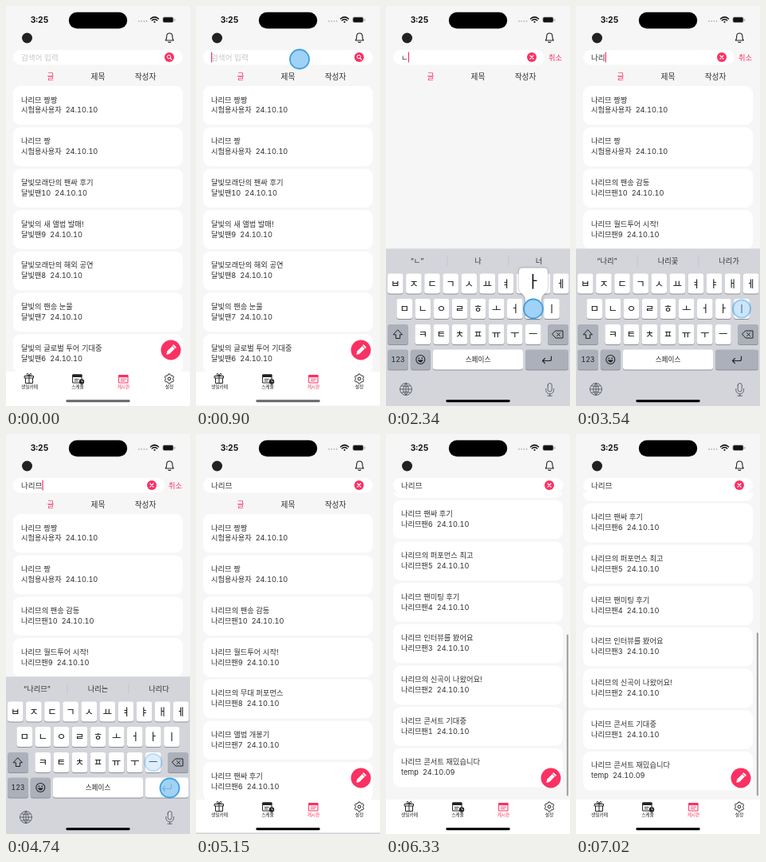
These frames come from a looping animation (231 px wide and 500 px high, 7070 ms). An HTML page:

```html
<!DOCTYPE html>
<html lang="ko">
<head>
<meta charset="utf-8">
<title>게시판 검색</title>
<style>
html, body { margin: 0; height: 100%; overflow: hidden; background: #f6f6f6; }
svg { display: block; width: 100%; height: 100%; }
text { font-family: Inter, "Noto Sans CJK KR", sans-serif; font-variant-numeric: tabular-nums; white-space: pre; }
</style>
</head>
<body>
<svg id="stage" viewBox="0 0 231 500">
  <defs><clipPath id="view"><path d="M0 73H231V457H0z"/></clipPath></defs>
</svg>
<script>
const LOOP = 7070, PINK = '#fa3163', INK = '#303030', PITCH = 51.7, MAX = 323.4;
const stage = document.getElementById('stage');

function el(tag, attrs, parent = stage) {
  const node = document.createElementNS('http://www.w3.org/2000/svg', tag);
  for (const k in attrs) node.setAttribute(k, attrs[k]);
  return parent.appendChild(node);
}
const group = (parent, attrs = {}) => el('g', attrs, parent);
const box = (parent, x, y, width, height, rx, fill) =>
  el('rect', { x, y, width, height, rx, fill }, parent);
const disc = (parent, cx, cy, r, fill) => el('circle', { cx, cy, r, fill }, parent);
const line = (parent, d, stroke = '#222', width = 1, fill = 'none') =>
  el('path', { d, stroke, fill, 'stroke-width': width, 'stroke-linecap': 'round', 'stroke-linejoin': 'round' }, parent);
function label(parent, str, x, y, size, fill = INK, anchor = 'start', weight = 400) {
  const node = el('text', { x, y: y + size * 0.38, 'font-size': size, fill, 'text-anchor': anchor, 'font-weight': weight }, parent);
  node.textContent = str;
  return node;
}
const show = (node, on) => node.setAttribute('display', on ? 'inline' : 'none');
const move = (node, x, y) => node.setAttribute('transform', `translate(${x} ${y})`);
const clamp = v => Math.max(0, Math.min(1, v));
const easeOut = v => 1 - (1 - clamp(v)) ** 3;

// Posts: [title, author, date]
const DAY = '24.10.10';
const numbered = (titles, fan) => titles.map((title, i) => [title, fan + (10 - i), DAY]);
const pinned = [['나리므 짱짱', '시험용사용자', DAY], ['나리므 짱', '시험용사용자', DAY]];
const allPosts = [...pinned, ...numbered([
  '달빛모래단의 팬싸 후기', '달빛의 새 앨범 발매!', '달빛모래단의 해외 공연',
  '달빛의 팬송 눈물', '달빛의 글로벌 투어 기대중'], '달빛팬')];
const hits = [...pinned, ...numbered([
  '나리므의 팬송 감동', '나리므 월드투어 시작!', '나리므의 무대 퍼포먼스', '나리므 앨범 개봉기',
  '나리므 팬싸 후기', '나리므의 퍼포먼스 최고', '나리므 팬미팅 후기', '나리므 인터뷰를 봤어요',
  '나리므의 신곡이 나왔어요!', '나리므 콘서트 기대중'], '나리므팬'),
  ['나리므 콘서트 재밌습니다', 'temp', '24.10.09']];

function postList(parent, posts) {
  const g = group(parent);
  posts.forEach(([title, author, date], i) => {
    const y = 117 + i * PITCH;
    box(g, 9, y - 17, 213, 48.6, 9, '#fff');
    label(g, title, 19, y, 9.3);
    label(g, `${author}  ${date}`, 19, y + 13, 9.2);
  });
  return g;
}

box(stage, 0, 0, 231, 500, 0, '#f6f6f6');
const scroller = group(group(stage, { 'clip-path': 'url(#view)' }));
[['글', 56, PINK], ['제목', 115.5, INK], ['작성자', 175, INK]].forEach(([s, x, c]) =>
  label(scroller, s, x, 88, 9.7, c, 'middle', 500));
const listAll = postList(scroller, allPosts), listHits = postList(scroller, hits);
const bar = box(stage, 226.8, 78, 2.2, 204, 1.1, '#a5a5a5');

// Status bar and header
label(stage, '3:25', 42, 17.3, 10.3, '#111', 'middle', 700);
box(stage, 78.8, 7.8, 73.4, 20.4, 10.2, '#000');
for (let i = 0; i < 4; i++) disc(stage, 167 + i * 3.2, 19, 0.8, '#999');
line(stage, 'M181.5 16Q186.5 11.8 191.5 16M183.3 18Q186.5 15.4 189.7 18', '#111', 1.5);
disc(stage, 186.5, 20, 1.1, '#111');
box(stage, 196.5, 13.5, 14, 7.5, 2.2, '#aaa');
box(stage, 197.3, 14.3, 12.4, 5.9, 1.6, '#111');
box(stage, 211.2, 16, 1.2, 2.8, 0.6, '#aaa');
disc(stage, 26.5, 40, 6.5, '#222');
line(stage, 'M200.3 43C201.8 41.6 201.5 39.8 201.7 37.6C202 32.8 208.6 32.8 208.9 37.6C209.1 39.8 208.8 41.6 210.3 43z', '#222', 1.1);
line(stage, 'M203.8 45Q205.3 46.1 206.8 45', '#222', 1.1);

// Search field
const field = box(stage, 9, 55, 213, 18.3, 9, '#fff');
const hint = label(stage, '검색어 입력', 19, 64, 9.6, '#c6c6c6');
const typed = label(stage, '', 19, 64.3, 9.6);
const caret = box(stage, 19, 57.5, 1.2, 13, 0.5, PINK);
const cancel = label(stage, '취소', 204, 64, 9.3, PINK);
const button = group(stage);
disc(button, 0, 64, 6, PINK);
const lens = group(button), cross = group(button);
line(lens, 'M1.2 65.2L3 67', '#fff', 1.1);
el('circle', { cx: -0.4, cy: 63.5, r: 2.2, fill: 'none', stroke: '#fff' }, lens);
line(cross, 'M-2 62L2 66M2 62L-2 66', '#fff', 1.2);

// Write button
disc(stage, 207, 430, 12.5, PINK);
line(stage, 'M201.8 435.2L202.6 431.6L208.8 425.4L211.6 428.2L205.4 434.4z', '#fff', 0.6, '#fff');
line(stage, 'M210.2 424.2L212.8 426.8', '#fff', 1.9);

// Tab bar
box(stage, 0, 457, 231, 43, 0, '#fff');
line(stage, 'M24.5 465V471.5H33.5V465M23.5 462.5H34.5V465H23.5zM29 462.5V471.5M29 462.3C26 462.3 25.3 459.5 27 459.5C28.3 459.5 29 461 29 462.3C29 461 29.7 459.5 31 459.5C32.7 459.5 32 462.3 29 462.3', '#222', 1);
line(stage, 'M84 461H95V471H84z', '#222', 1);
box(stage, 83.6, 460.5, 11.8, 3.5, 1, '#222');
line(stage, 'M86.2 466.5H91M86.2 468.7H90', '#222', 0.9);
disc(stage, 95, 469.5, 3.2, '#222');
line(stage, 'M95 467.8V469.6H96.4', '#fff', 0.7);
line(stage, 'M142 461.5H153V471H142z', PINK, 1);
box(stage, 141.6, 461, 11.8, 3.2, 1, PINK);
line(stage, 'M144.3 466.3H150.7M144.3 468.6H149', PINK, 0.9);
let gear = '';
for (let i = 0; i < 24; i++) {
  const a = (i - 0.5) * Math.PI / 12, r = i % 4 < 2 ? 6 : 4.8;
  gear += `${i ? 'L' : 'M'}${205 + r * Math.sin(a)} ${466 - r * Math.cos(a)}`;
}
line(stage, gear + 'z', '#222', 1);
el('circle', { cx: 205, cy: 466, r: 1.9, fill: 'none', stroke: '#222' });
[['생일카페', 29.5], ['스케줄', 90], ['게시판', 147.5], ['설정', 205]].forEach(([s, x], i) =>
  label(stage, s, x, 476, 5.7, i === 2 ? PINK : '#222', 'middle', 500));

// Keyboard
const board = group(stage);
box(board, 0, 303.3, 231, 200, 0, '#d3d5db');
line(board, 'M77 312V325M154 312V325', '#bfc2c9', 0.7);
const words = [39, 115.5, 192].map(x => label(board, '', x, 318, 9.3, '#333', 'middle'));

function key(x, y, w, fill = '#fff') {
  box(board, x - w / 2, y - 11.6, w, 25, 3, '#8d9097');
  return box(board, x - w / 2, y - 12.4, w, 25, 3, fill);
}
const keys = {};
[['ㅂㅈㄷㄱㅅㅛㅕㅑㅐㅔ', 11.8, 347], ['ㅁㄴㅇㄹㅎㅗㅓㅏㅣ', 23.2, 378.5], ['ㅋㅌㅊㅍㅠㅜㅡ', 46.2, 410.5]]
  .forEach(([row, x0, y]) => [...row].forEach((c, i) => {
    const x = x0 + i * 23.1;
    keys[c] = [x, y];
    key(x, y, 19.6);
    label(board, c, x, y, 12.5, '#111', 'middle', 500);
  }));
const DARK = '#abb0ba';
key(15, 410.5, 26, DARK);
key(216, 410.5, 26, DARK);
key(15, 442, 26, DARK);
key(43.3, 442, 25, DARK);
key(115.5, 442, 113);
const enter = key(202, 442, 54, DARK);
keys.enter = [205.5, 442.5];
line(board, 'M15 405L20.5 410.8H17.6V415.5H12.4V410.8H9.5z', '#222', 1);
line(board, 'M213 406H222V415H213L208.8 410.5zM214.6 408.6L218.6 412.6M218.6 408.6L214.6 412.6', '#222', 1);
label(board, '123', 15, 442, 8.8, '#222', 'middle');
el('circle', { cx: 43.3, cy: 442, r: 5.5, fill: 'none', stroke: '#222', 'stroke-width': 1.1 }, board);
disc(board, 41.4, 440.3, 0.9, '#222');
disc(board, 45.2, 440.3, 0.9, '#222');
line(board, 'M40.4 443Q43.3 447.4 46.2 443z', '#222', 0.7, '#222');
label(board, '스페이스', 115.5, 442, 8.6, '#222', 'middle');
line(board, 'M207.5 438V441.5Q207.5 443.5 205.5 443.5H196.5M199.5 440.5L196.5 443.5L199.5 446.5', '#222', 1.1);
const GREY = '#555a61';
line(board, 'M17.5 479A7.5 7.5 0 1 0 32.5 479A7.5 7.5 0 1 0 17.5 479M17.5 479H32.5M25 471.5V486.5M25 471.5Q18 479 25 486.5Q32 479 25 471.5M19.3 474.7Q25 477 30.7 474.7M19.3 483.3Q25 481 30.7 483.3', GREY, 0.9);
line(board, 'M203.2 474V479.5A2.5 2.5 0 0 0 208.2 479.5V474A2.5 2.5 0 0 0 203.2 474zM200.8 478.5V480A4.9 4.9 0 0 0 210.6 480V478.5M205.7 485V487.3M203 487.3H208.4', GREY, 0.9);

const bubble = group(board, { style: 'filter:drop-shadow(0 0.5px 1.5px rgba(0,0,0,.35))' });
el('path', { fill: '#fff', d: 'M-13.5 -51H13.5Q18 -51 18 -46V-26C18 -19 10 -19 10 -11V9Q10 12.5 7 12.5H-7Q-10 12.5 -10 9V-11C-10 -19 -18 -19 -18 -26V-46Q-18 -51 -13.5 -51z' }, bubble);
const bubbleText = label(bubble, '', 0, -34, 20, '#111', 'middle');

const home = box(stage, 75.3, 492.3, 80.4, 2.9, 1.45, '#000');

// Touches: [spot, down, up]
const touches = [
  ['field', 100, 980], ['ㄴ', 1660, 1800], ['ㅏ', 2240, 2420], ['ㄹ', 2850, 2990],
  ['ㅣ', 3340, 3430], ['ㅁ', 3840, 3980], ['ㅡ', 4440, 4580], ['enter', 4690, 4850], ['drag', 5480, 5760]
].map(([spot, down, up]) => ({
  spot, down, up,
  dot: el('circle', { r: 12, fill: '#8fcaf5', 'fill-opacity': 0.85, stroke: '#409fe4', 'stroke-width': 1.8 })
}));

// Typing: [time, text, second and third suggestion]
const typing = [
  [0, '', '내가', '나'], [1760, 'ㄴ', '나', '너'], [2430, '나', '나는', '나도'], [2950, '날', '날씨', '날이'],
  [3430, '나리', '나리꽃', '나리가'], [3940, '나림', '나리는', '나리'], [4600, '나리므', '나리는', '나리다']
];

function scrollAt(t) {
  if (t < 5500) return 0;
  if (t < 5710) return 206.5 * (t - 5500) / 210;
  if (t < 5950) return 206.5 + 140 * (1 - (1 - (t - 5710) / 240) ** 2);
  const u = (t - 5950) / 120;
  return MAX + (346.5 - MAX) * (1 + u) * Math.exp(-u);
}

function render(t) {
  const [, text, second, third] = typing.findLast(step => t >= step[0]);
  const open = easeOut((t - 900) / 400) * (1 - easeOut((t - 4850) / 400));
  const scroll = scrollAt(t);

  move(board, 0, 198 * (1 - open));
  field.setAttribute('width', 213 - 23 * open);
  move(button, 205 - 22 * open, 0);
  move(cancel, 27 * (1 - open), 0);
  show(cancel, open > 0);
  home.setAttribute('fill', text ? '#000' : '#666');

  typed.textContent = text;
  show(hint, !text);
  show(lens, !text);
  show(cross, text);
  show(caret, t >= 900 && t < 4850);
  caret.setAttribute('x', 19 + (text ? typed.getComputedTextLength() : 0));
  [text ? `“${text}”` : '오늘', second, third].forEach((s, i) => words[i].textContent = s);

  show(listAll, !text);
  show(listHits, text && '나리므'.startsWith(text));
  move(scroller, 0, -scroll);
  const top = 77.5 + 0.528 * scroll;
  bar.setAttribute('y', top);
  bar.setAttribute('height', Math.min(204, 452.5 - top));
  show(bar, t >= 5500);

  let pressed = '';
  for (const { spot, down, up, dot } of touches) {
    const fade = t < down ? 0 : 1 - clamp((t - up) / 250);
    const [x, y] = spot === 'field' ? [130, 66.5] : spot === 'drag' ? [190, Math.max(150, 370 - scroll)] : keys[spot];
    move(dot, x, y);
    dot.setAttribute('opacity', fade);
    dot.setAttribute('r', 10 + 2 * fade);
    if (t >= down && t < up && keys[spot]) pressed = spot;
  }
  enter.setAttribute('fill', pressed === 'enter' ? '#fff' : DARK);
  const pop = pressed && pressed !== 'enter';
  show(bubble, pop);
  if (pop) {
    move(bubble, ...keys[pressed]);
    bubbleText.textContent = pressed;
  }
}

const start = performance.now();
function tick() {
  render((performance.now() - start) % LOOP);
  requestAnimationFrame(tick);
}
tick();
</script>
</body>
</html>
```
